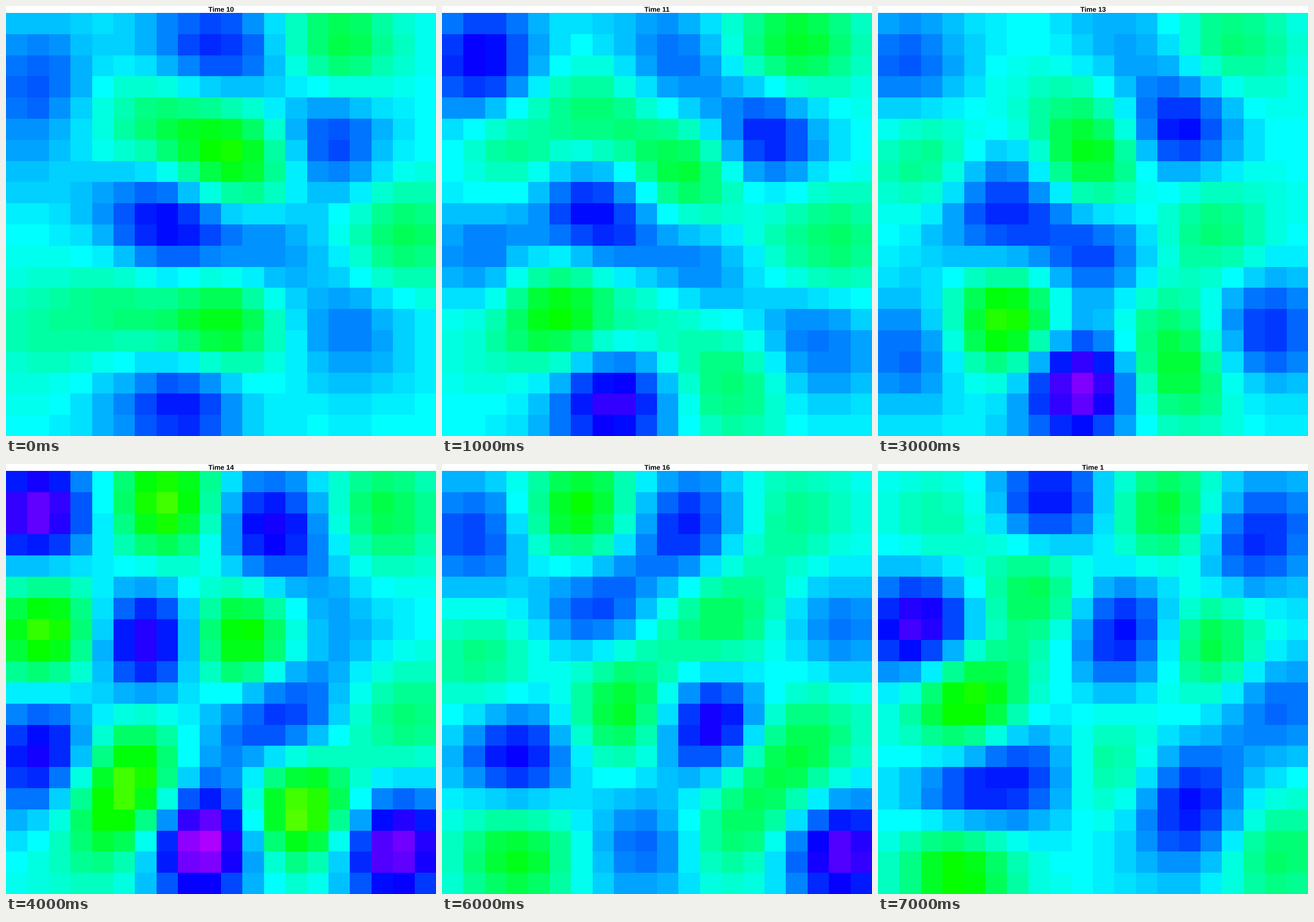
Animation, 748 px wide and 748 px high, one loop 8000 ms. Source, as a matplotlib script:

```python
import numpy as np
import matplotlib.pyplot as plt
from matplotlib.animation import FuncAnimation
from matplotlib.colors import hsv_to_rgb

SIZE, TOP, CELLS = 748, 12, 20
MEAN, REACH, NUGGET = 50, 1.9, 0.01   # cyan hue step, correlation length in cells

plt.rcParams["text.hinting"] = "no_hinting"


def cell_of(pixels):
    return ((np.arange(pixels) + 0.5) * CELLS / pixels).astype(int)


PIXELS = np.ix_(cell_of(SIZE - TOP), cell_of(SIZE))
GRID = np.array([(c, r) for r in range(CELLS) for c in range(CELLS)], float)


def kernel(a, b):
    gap = a[:, None, :] - b[None, :, :]
    return np.exp(-(gap ** 2).sum(axis=2) / (2 * REACH ** 2))


def field(*peaks):
    """Smooth surface through its main peaks (column, row, height):
    positive heights turn blue, negative ones green."""
    peaks = np.array(peaks, float)
    at, height = peaks[:, :2], peaks[:, 2]
    weights = np.linalg.solve(kernel(at, at) + NUGGET * np.eye(len(at)), height)
    return (kernel(GRID, at) @ weights).reshape(CELLS, CELLS)


def picture(surface):
    """Colour the cells from a rainbow of 100 hues and enlarge them."""
    hue = np.clip(np.rint(MEAN + surface), 0, 99) / 100
    full = np.ones_like(hue)
    return hsv_to_rgb(np.dstack([hue, full, full]))[PIXELS]


time10 = field(
    (1, 2.5, 11), (7.5, 1, 10), (10, 1.5, 13), (15, 1, -12), (0, 6, 6),
    (6, 4.5, -9), (9, 5.5, -17), (11, 7, -13), (14.5, 5.5, 12), (3.5, 8.5, 5),
    (6, 9, 15), (8, 10, 15), (11.5, 10.5, 8), (18, 10, -11), (5, 13.5, -9),
    (9.5, 14, -16), (1, 14.5, -6), (15.5, 14.5, 9), (5, 18, 8), (8, 18, 15))

time12 = field(
    (1.5, 1.5, 27), (7, 2.5, -9), (10.5, 3, 10), (16.5, 1, -19), (7, 4, -9),
    (2.5, 6, -16), (14.5, 5.5, 18), (6.5, 8.5, 18), (11.5, 7.5, -14),
    (15.5, 9.5, -9), (9, 10.5, 8), (18, 11, -8), (1.5, 11, 18), (11, 12, 13),
    (5, 13.5, -25), (4, 15.5, -14), (17.5, 15.5, 14), (13, 17, -20),
    (7.5, 17.5, 26), (5, 18.5, 11))

time13 = field(
    (1, 2, 11), (10.5, 1, 6), (16, 1, -9), (7, 3, -4), (8.5, 4, -9),
    (13.5, 5, 16), (2, 6.5, -7), (9.5, 6.5, -15), (5.5, 8, 13), (15, 9.5, -9),
    (3.5, 10, 8), (7, 10, 12), (10, 11, 12), (5.5, 14, -20), (12, 14, -7),
    (17.5, 14.5, 14), (1, 15.5, 10), (13.5, 16.5, -14), (9, 17, 25),
    (6.5, 18.5, 9))

time14 = field(
    (1, 1.5, 24), (7, 1, -21), (11.5, 2, 18), (17, 1.5, -12), (13, 3.5, 13),
    (1.5, 7, -20), (6, 7.5, 20), (10.5, 7.5, -18), (15, 7, 6), (12.5, 10.8, 13),
    (18, 11, -9), (1.5, 12.5, 17), (5.5, 13, -17), (10, 12.5, 9),
    (0.5, 14.5, 12), (5, 15.5, -20), (13.2, 15.5, -23), (8.5, 17, 29),
    (17.5, 17.3, 25), (3, 18, -7))

time16 = field(
    (1, 2.5, 13), (6, 1.5, -17), (11, 2, 15), (16, 1.5, -7), (9, 4, 9),
    (14, 4, -5), (6.5, 6, 12), (12.5, 6.5, -11), (18, 7, 9), (1.5, 8.5, -8),
    (10, 8, -6), (8, 10.8, -14), (12, 11.5, 19), (17, 11.5, -10), (3, 13, 17),
    (15, 13.5, -12), (13, 16.5, -10), (3, 17.5, -15), (9, 17.2, 10),
    (18, 17.5, 23))

time1 = field(
    (2.5, 2, -5), (7.5, 1, 16), (13, 1.5, -13), (17.5, 2, 14), (16, 4, 9),
    (7, 5, -11), (1.5, 7, 21), (11, 7, 16), (15, 7.5, -12), (9.5, 8.5, 9),
    (6, 9, -9), (3.5, 10.5, -19), (18, 10.5, 10), (6.5, 13.5, 13),
    (10.5, 13.5, -6), (3.5, 15, 13), (14, 14.8, 16), (13.5, 17, 12),
    (3.3, 18, -17), (18, 17.5, -10))

steps = [
    (10, time10),
    (11, (time10 + time12) / 2),
    (12, time12),
    (13, time13),
    (14, time14),
    (15, (time14 + time16) / 2),
    (16, time16),
    (1, time1),
]

fig = plt.figure(figsize=(8.5, 8.5), dpi=88, facecolor="white")
ax = fig.add_axes([0, 0, 1, 1])
image = ax.imshow(picture(time10), extent=(0, SIZE, SIZE, TOP),
                  interpolation="nearest", aspect="auto")
ax.set_xlim(0, SIZE)
ax.set_ylim(SIZE, 0)
ax.axis("off")
title = ax.text(SIZE / 2, 10, "", ha="center", va="baseline", color="black",
                family="Liberation Sans", weight="bold", size=12 * 72 / 88)


def draw(i):
    time, surface = steps[i]
    image.set_data(picture(surface))
    title.set_text(f"Time {time}")
    return image, title


anim = FuncAnimation(fig, draw, frames=len(steps), interval=1000,
                     repeat=True, repeat_delay=0)
plt.show()
```
